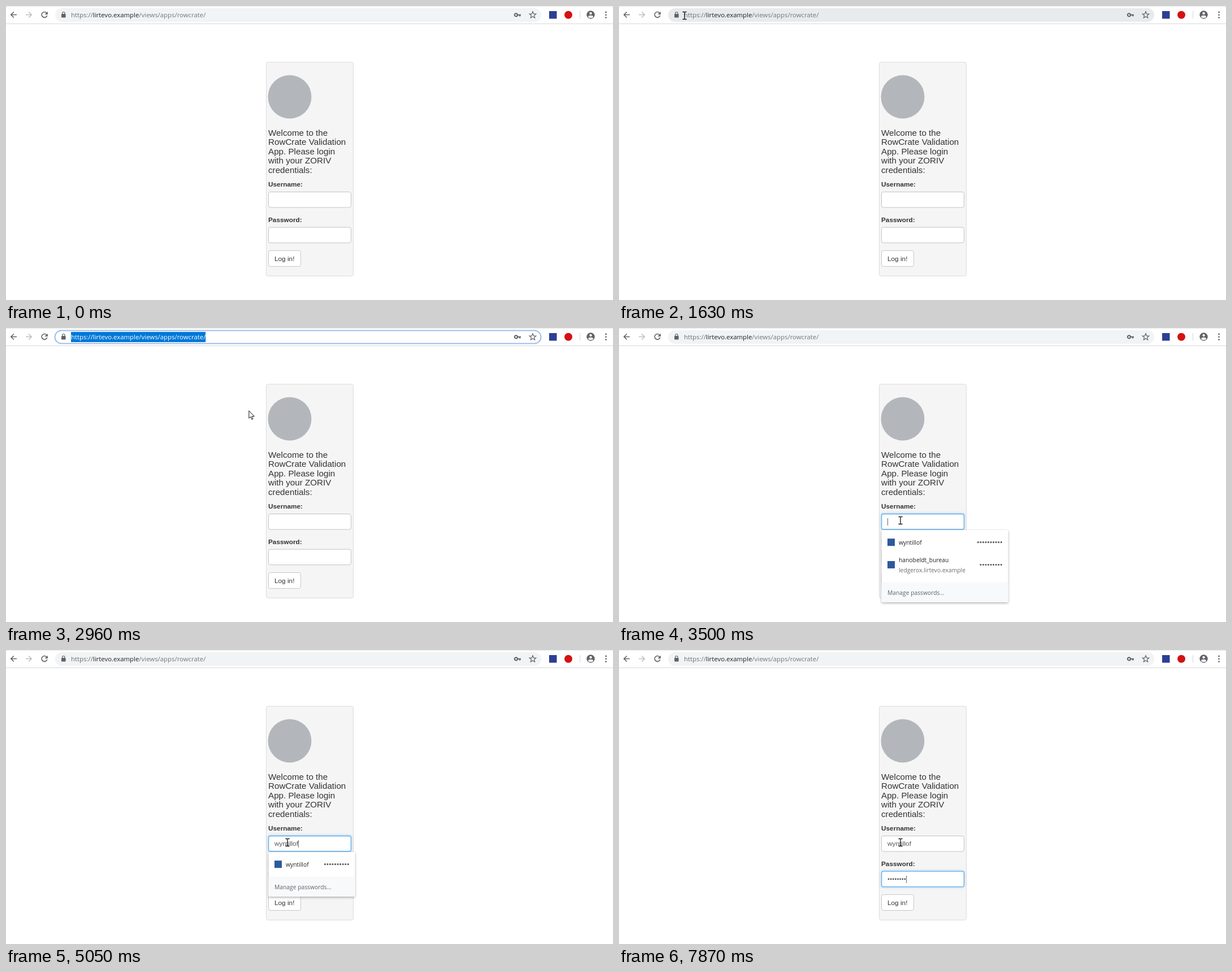
Write an HTML page with a canvas that moves like this. It is 1074 by 521 pixels and loops after 8000 ms.

```html
<!DOCTYPE html>
<html lang="en">
<head>
<meta charset="utf-8">
<title>Login form</title>
<style>
  html, body { margin: 0; width: 100%; height: 100%; overflow: hidden; background: #fff; }
  canvas { display: block; }
</style>
</head>
<body>
<canvas id="stage" width="1074" height="521"></canvas>
<script>
const c = document.getElementById('stage').getContext('2d');
const LOOP = 8000, TICK = 78;
const UI = '"Open Sans", "Noto Sans", sans-serif';
const PAGE = '"Liberation Sans", Arial, sans-serif';
const URL_FONT = '11.4px ' + UI, MENU_FONT = '10.3px ' + UI;
const INPUT_FONT = '11.8px ' + PAGE, LABEL_FONT = 'bold ' + INPUT_FONT;
const GREY = '#5f6368', BLUE = '#66afe9';

const USER = 'wyntillof';
const SITE = 'lirtevo.example';
const URL_PARTS = [['https://', '#6b6f73'], [SITE, '#202124'], ['/views/apps/rowcrate/', '#74787c']];
const URL_TEXT = URL_PARTS.map(p => p[0]).join('');
const HEADING = ['Welcome to the', 'RowCrate Validation', 'App. Please login', 'with your ZORIV', 'credentials:'];

const USER_KEYS = [3960, 4030, 4270, 4430, 4510, 4580, 4660, 4820, 5050];
const PASS_KEYS = [6230, 6610, 6930, 7160, 7320, 7470, 7710, 7870];

// Pointer keys: tick, x, y
const PATH = [
  [5, 959, 505], [8, 375, 164], [9, 375, 164], [13, 158, 35], [14, 158, 35], [21, 116, 17],
  [25, 116, 17], [28, 303, 21], [31, 389, 30], [35, 389, 30], [43, 498, 341]
];

const count = (keys, t) => keys.filter(k => t >= k).length;

function text(s, x, y, font, color) {
  c.font = font;
  c.fillStyle = color;
  c.fillText(s, x, y);
}

function width(s, font) {
  c.font = font;
  return c.measureText(s).width;
}

function rect(x, y, w, h, color) {
  c.fillStyle = color;
  c.fillRect(x, y, w, h);
}

function box(x, y, w, h, r, fill, stroke, line = 1) {
  c.beginPath();
  c.roundRect(x, y, w, h, r);
  c.fillStyle = fill;
  c.fill();
  if (!stroke) return;
  c.lineWidth = line;
  c.strokeStyle = stroke;
  c.stroke();
}

function dot(x, y, r, color) {
  c.beginPath();
  c.arc(x, y, r, 0, 7);
  c.fillStyle = color;
  c.fill();
}

function dots(n, x, y, step, r, color) {
  for (let i = 0; i < n; i++) dot(x + i * step, y, r, color);
}

function draw(d, color, line = 1.6) {
  c.strokeStyle = color;
  c.lineWidth = line;
  c.stroke(new Path2D(d));
}

function shadow(color, blur, dy = 0) {
  c.shadowColor = color;
  c.shadowBlur = blur;
  c.shadowOffsetY = dy;
}
const noShadow = () => shadow('transparent', 0);

function drawUrl(override) {
  let x = 115;
  for (const [s, color] of URL_PARTS) {
    text(s, x, 20, URL_FONT, override || color);
    x += width(s, URL_FONT);
  }
}

function star(x, y) {
  c.beginPath();
  for (let i = 0; i < 10; i++) {
    const a = i * Math.PI / 5, r = i % 2 ? 2.7 : 6.2;
    c.lineTo(x + r * Math.sin(a), y - r * Math.cos(a));
  }
  c.closePath();
  c.strokeStyle = GREY;
  c.lineWidth = 1.2;
  c.stroke();
}

// Right edge of the selection, snapped to the letter nearest the pointer
function selectionEnd(x) {
  let best = 115;
  for (let i = 1; i <= URL_TEXT.length; i++) {
    const edge = 115 + width(URL_TEXT.slice(0, i), URL_FONT);
    if (Math.abs(edge - x) < Math.abs(best - x)) best = edge;
  }
  return best;
}

function toolbar(focused, hovered, selectTo) {
  rect(0, 0, 1074, 1, '#e3e5e8');
  rect(0, 31, 1074, 1, '#d6d8da');
  draw('M19 15.5H9M13.8 10.5L8.8 15.5L13.8 20.5', GREY);
  draw('M35 15.5H45M40.2 10.5L45.2 15.5L40.2 20.5', '#bdbfc1');
  draw('M71.6 12.1A4.9 4.9 0 1 0 72.7 16.8', GREY);
  c.fillStyle = GREY;
  c.fill(new Path2D('M73.8 9.8V15H68.6Z'));

  if (focused) box(86.5, 4.5, 860, 23, 11.5, '#fff', '#9dbdf0', 2);
  else box(87, 4, 860, 24, 12, hovered ? '#e8eaed' : '#f1f3f4');

  box(98, 14, 7.6, 6.4, 1, GREY);
  draw('M99.7 14V12.6A2.1 2.1 0 0 1 103.9 12.6V14', GREY, 1.2);
  drawUrl();
  if (selectTo > 115) {
    c.save();
    c.beginPath();
    c.rect(115, 7, selectTo - 115, 18);
    c.clip();
    rect(115, 7, selectTo - 115, 18, '#0078d7');
    drawUrl('#fff');
    c.restore();
  }

  draw('M905 15.8A2.6 2.6 0 1 0 899.8 15.8A2.6 2.6 0 1 0 905 15.8H911M909.2 15.8V18.6', GREY, 2);
  star(932, 16);
  rect(961, 9, 13.5, 13.5, '#2c3f94');
  dot(995, 15.7, 7, '#d31212');
  rect(1015, 9, 1, 13, '#d5d7da');
  dot(1034.5, 15.5, 7.2, GREY);
  dot(1034.5, 13, 2.2, '#fff');
  c.beginPath();
  c.ellipse(1034.5, 19, 4.3, 2.2, 0, 0, 7);
  c.fill();
  for (const y of [11, 15.8, 20.6]) dot(1061.5, y, 1.4, GREY);
}

function field(y, focused) {
  if (focused) shadow('rgba(102,175,233,.4)', 4);
  box(464.5, y + .5, 146, 27.5, 3.3, '#fff', focused ? BLUE : '#c4c4c4', focused ? 1.3 : 1);
  noShadow();
}

function caret(x, y) {
  rect(Math.round(x), y, 1, 13, '#666');
}

function form(t) {
  box(460.5, 99.5, 154, 379, 3, '#f5f5f5', '#dcdcdc');
  dot(502, 161, 38.5, '#b3b7bb');
  HEADING.forEach((s, i) => text(s, 464, 230 + i * 16.45, '15.2px ' + PAGE, '#333'));

  const onUser = t >= 3420 && t < 5360, onPass = t >= 5360;
  text('Username:', 464, 320.3, LABEL_FONT, '#333');
  field(329, onUser);
  const typed = USER.slice(0, count(USER_KEYS, t));
  text(typed, 475, 347.3, INPUT_FONT, '#555');
  if (onUser) caret(475 + width(typed, INPUT_FONT), 337);

  text('Password:', 464, 383.2, LABEL_FONT, '#333');
  field(391.7, onPass);
  const n = count(PASS_KEYS, t);
  dots(n, 477, 406, 4.12, 1.45, '#555');
  if (onPass && (t < 5920 || n)) caret(475 + n * 4.12, 400);

  box(464.5, 433.5, 57, 28, 3.3, '#fff', '#c8c8c8');
  text('Log in!', 475, 451.6, INPUT_FONT, '#333');
}

function entry(y, right, n) {
  rect(475, y - 6.5, 13, 13, '#2d5a9e');
  dots(n, right - 1.7 - (n - 1) * 4.55, y, 4.55, 1.6, '#5c5f63');
}

function menu(w, h, full) {
  const right = 464 + w - 10, bottom = 358 + h;
  shadow('rgba(0,0,0,.32)', 4, 1.5);
  box(464.5, 358, w, h, 2, '#fff');
  noShadow();
  box(464.5, bottom - 35.5, w, 35.5, [0, 0, 2, 2], '#f8f9fa');
  entry(379.7, right, 10);
  text(USER, 495, 383.6, MENU_FONT, '#202124');
  if (full) {
    entry(419.5, right, 9);
    text('hanobeldt_bureau', 495, 414.8, MENU_FONT, '#202124');
    text('ledgerox.' + SITE, 495, 433, MENU_FONT, '#6a6e72');
  }
  text('Manage passwords...', 475, bottom - 12.7, MENU_FONT, GREY);
}

function pointerAt(k) {
  if (k < PATH[0][0]) return null;
  const i = PATH.findIndex(p => p[0] > k);
  if (i < 0) return PATH[PATH.length - 1].slice(1);
  const [k0, x0, y0] = PATH[i - 1], [k1, x1, y1] = PATH[i];
  const f = (k - k0) / (k1 - k0);
  return [x0 + (x1 - x0) * f, y0 + (y1 - y0) * f];
}

function pointer(x, y, beam) {
  c.save();
  c.translate(x, y);
  if (beam) {
    draw('M-3.5 -6.5H-1L0 -5.8L1 -6.5H3.5M0 -6V6M-3.5 6.5H-1L0 5.8L1 6.5H3.5', '#111', 1.3);
  } else {
    const arrow = new Path2D('M0 0V13.4L3 10.7L5.1 15.4L7.1 14.5L5.1 10H9.4Z');
    c.fillStyle = '#fff';
    c.fill(arrow);
    c.strokeStyle = '#111';
    c.lineWidth = 1;
    c.stroke(arrow);
  }
  c.restore();
}

function render(t) {
  const k = Math.floor((t + 14) / TICK);
  const at = pointerAt(k);
  rect(0, 0, 1074, 521, '#fff');

  const focused = t >= 1780 && t < 3420;
  const hovered = at && at[1] < 28;
  const selectTo = focused && k >= 26 ? selectionEnd(k > 31 ? 389 : at[0]) : 0;
  toolbar(focused, hovered, selectTo);
  form(t);

  if (t >= 3496 && t < 4030) menu(224, 128, true);
  if (t >= 4190 && t < 5360) menu(153, 79, false);

  if (!at) return;
  const [x, y] = at;
  const pressed = (k >= 23 && k < 32) || (k >= 43 && k < 45);
  const dragging = k > 25 && k < 36, overField = y > 329 && k > 40;
  if (pressed) dot(x, y, 11, 'rgba(255,232,0,.6)');
  pointer(x, y, hovered || dragging || overField);
}

function loop() {
  render(performance.now() % LOOP);
  requestAnimationFrame(loop);
}
loop();
</script>
</body>
</html>
```
